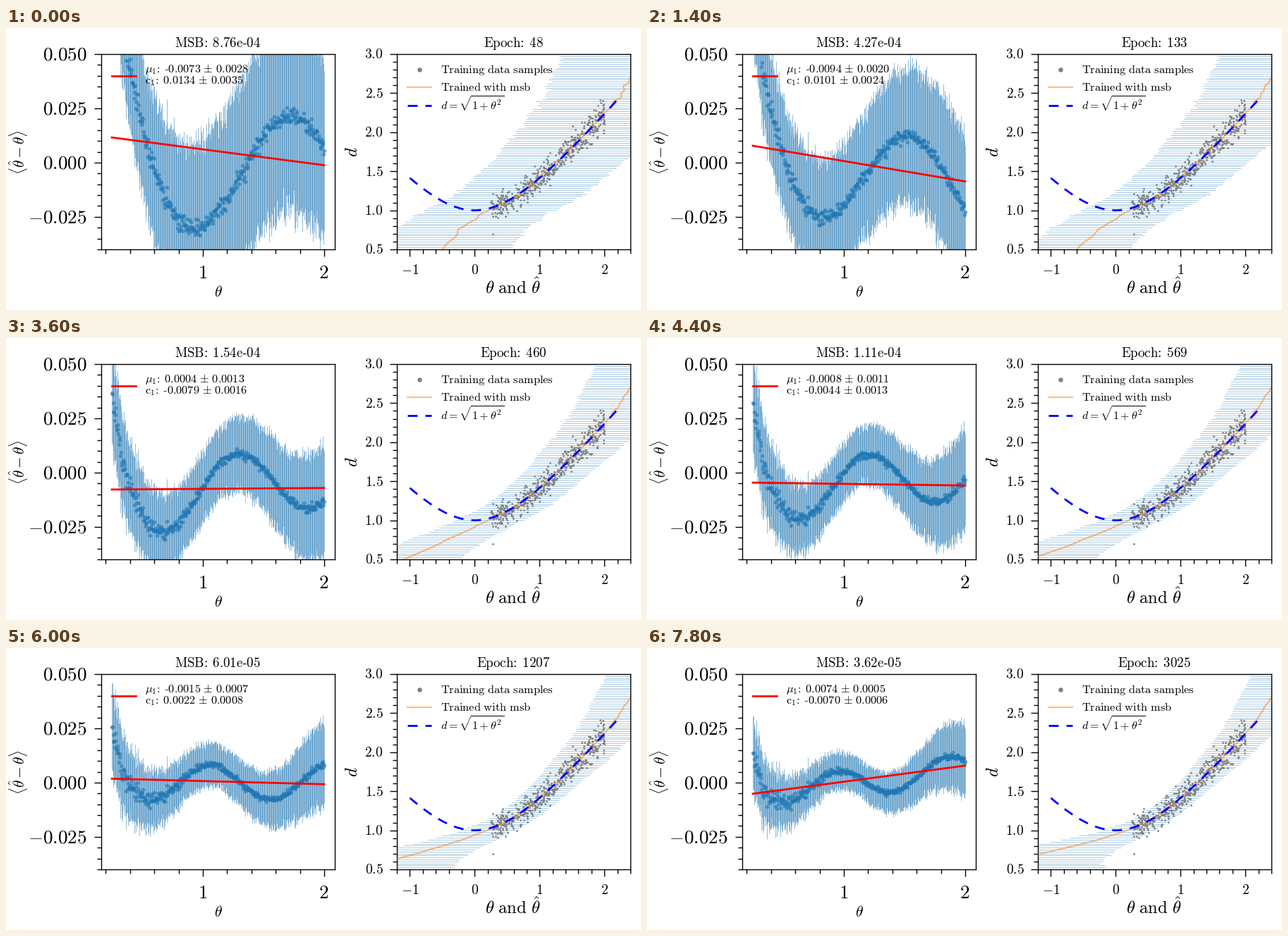
A matplotlib script for the animation above (8 s loop, 900 by 400 pixels).

```python
import numpy as np
import matplotlib.pyplot as plt
from matplotlib.animation import FuncAnimation
from matplotlib.lines import Line2D
from matplotlib.ticker import MultipleLocator

plt.rcParams.update({
    "font.family": "Liberation Serif",
    "mathtext.fontset": "cm",
    "axes.linewidth": 1.0,
})

W, H = 900, 400
FRAMES, INTERVAL = 40, 200
BLUE, ORANGE, GRAY = "tab:blue", "tab:orange", "gray"

# Training milestones: frame, epoch, MSB, then slope, slope error, offset (1e-4)
MILESTONES = np.array([
    [0, 48, 8.76e-4, -73, 28, 134],
    [7, 133, 4.27e-4, -94, 19.6, 101],
    [13, 320, 2.36e-4, -22, 17, 21],
    [18, 460, 1.54e-4, 4, 13, -79],
    [26, 705, 8.01e-5, -19, 8, -10],
    [34, 2066, 4.51e-5, -10, 5, 53],
    [39, 3025, 3.62e-5, 74, 5, -70],
])
STEP, EPOCH, MSB, SLOPE, ERROR, OFFSET = MILESTONES.T

rng = np.random.default_rng(7)
theta = np.linspace(.25, 2, 400)
point_noise = rng.normal(size=theta.size)
bar_noise = 1 + .08 * rng.normal(size=theta.size)
rows = np.linspace(.5, 3, 100)
row_noise = np.convolve(rng.normal(size=rows.size), [.35, .6, .35], "same")
row_noise *= .25 + .75 * np.clip(np.abs(rows - 1.6) - .5, 0, .5) / .5
width_noise = 1 + .025 * rng.normal(size=rows.size)
sample_x = rng.uniform(.25, 2, 500)
sample_d = np.sqrt(1 + sample_x ** 2) + rng.normal(0, .09, 500)
sample_x[0], sample_d[0] = .277, .7


def at(values, i):
    return np.interp(i, STEP, values)


def at_log(values, i):
    return np.exp(at(np.log(values), i))


def ripple(s):
    """Unit-variance bias wave without linear trend; tightens as s grows."""
    dip = .89 - .15 * s + .007 * s * s
    wave = -np.cos(np.pi * (theta - dip) / (.95 * dip))
    wave += 3 * np.exp(-(theta - .25) / (.2 * dip))
    wave -= np.polyval(np.polyfit(theta, wave, 1), theta)
    return wave / wave.std()


def bias_spread(s):
    rising = 1.13 * (1 - np.exp(-theta / .4))
    bowl = .62 + .85 * (theta - 1.1) ** 2
    mix = min(s / 2.4, 1)
    return .039 * np.exp(-s / 3) * ((1 - mix) * rising + mix * bowl)


def estimate(s):
    """Learned inverse of d(theta), bending away outside the training range."""
    below = np.maximum(1.1 - rows, 0)
    above = np.maximum(rows - 2.25, 0)
    inner = np.sqrt(np.clip(rows, 1.1, 2.25) ** 2 - 1)
    bend = .54 * s * s - 1.3
    return (inner - 2.4 * below - bend * below ** 2 + .85 * above
            + .06 / (1 + s) * row_noise)


def estimate_spread(s):
    low = np.maximum(1.5 - rows, 0)
    high = np.maximum(rows - 1.5, 0)
    width = np.exp(-.4 * s) + .18 * high + .06 * s ** 3 * low ** 4
    return width * width_noise


def rm(s):
    """Roman math text with true hyphens."""
    parts = []
    for chunk in s.split("-"):
        words = [rf"\text{{{w}}}" if w else "" for w in chunk.split(" ")]
        parts.append("$" + "~".join(words) + "$" if chunk else "")
    return "-".join(parts).replace(":}~", r":}\hspace{0.44}")


def measure(name, value, error):
    return f"${name}$" + rm(f": {value:.4f} ") + r"$\pm$" + rm(f" {error:.4f}")


def put(x, y, s, size, ha="center", **kw):
    return fig.text(x / W, 1 - y / H, s, size=size, ha=ha, va="baseline", **kw)


def upright(x, y, s, size):
    put(x, y, s, size, rotation=90, rotation_mode="anchor")


def stroke(x0, x1, y, **kw):
    fig.add_artist(Line2D([x0 / W, x1 / W], [1 - y / H] * 2,
                          transform=fig.transFigure, **kw))


def panel(x0, xlim, ylim, xstep, ystep):
    ax = fig.add_axes([x0 / W, 86 / H, 331 / W, 277 / H])
    ax.set(xlim=xlim, ylim=ylim)
    for axis, (major, minor) in ((ax.xaxis, xstep), (ax.yaxis, ystep)):
        axis.set_major_locator(MultipleLocator(major))
        axis.set_minor_locator(MultipleLocator(minor))
    ax.tick_params(which="both", labelleft=False, labelbottom=False, width=1)
    ax.tick_params(which="major", length=7)
    ax.tick_params(which="minor", length=4)
    return ax


fig = plt.figure(figsize=(W / 100, H / 100), dpi=100, facecolor="white")

# Left panel
left = panel(135, (.1625, 2.0875), (-.04, .05), (1, .2), (.025, .005))
bars = left.vlines(theta, 0 * theta, 0 * theta, color=BLUE, lw=.58, alpha=.6, zorder=1)
dots, = left.plot([], [], "o", color=BLUE, ms=3, alpha=.5, zorder=2)
fit, = left.plot([], [], color="red", lw=2, zorder=3)
for v in (.05, .025, 0, -.025):
    put(114.5, 190.9 - v * 3077.8 + 8.8, f"${v:.3f}$", 19.6, ha="right")
for v in (1, 2):
    put(278.5 + 172 * (v - 1), 355, f"${v}$", 19.6)
put(300.5, 381, r"$\theta$", 15.4)
upright(27, 176, r"$\langle\hat{\theta} - \theta\rangle$", 15.3)
stroke(150, 184, 68, color="red", lw=2)
slope_text = put(197, 63, "", 11.75, ha="left")
offset_text = put(197, 79, "", 11.75, ha="left")
msb_text = put(299.7, 27, "", 13.6)

# Right panel
right = panel(554, (-1.2, 2.4), (.5, 3), (1, .2), (.5, .1))
spans = right.hlines(rows, 0 * rows, 0 * rows, color=BLUE, lw=.5, alpha=.55, zorder=1)
right.plot(sample_x, sample_d, "o", color=GRAY, ms=2, mew=0, zorder=2)
curve, = right.plot([], [], color=ORANGE, lw=1.5, alpha=.5, zorder=3)
ideal = np.linspace(-1, 2.2, 200)
dash = dict(color="blue", lw=2, dashes=(5, 4), dash_capstyle="butt")
right.plot(ideal, np.sqrt(1 + ideal ** 2), zorder=4, **dash)
for v in np.arange(.5, 3.1, .5):
    put(534.5, 314 - (v - .5) * 110.8 + 6.4, f"${v:.1f}$", 14, ha="right")
for v in (-1, 0, 1, 2):
    put(664.3 + 91.94 * v, 348.7, f"${v}$", 14)
put(718.5, 377, r"$\theta~\text{and}~\hat{\theta}$", 17.7)
upright(498, 176, "$d$", 17.6)
fig.add_artist(Line2D([586.3 / W], [1 - 59 / H], marker="o", ms=4.7, mew=0,
                      color=GRAY, ls="none", transform=fig.transFigure))
stroke(569, 602.5, 84, color=ORANGE, lw=1.5, alpha=.5)
stroke(569, 602.5, 110, **dash)
put(615.5, 64, rm("Training data samples"), 11.75, ha="left")
put(615.5, 89, rm("Trained with msb"), 11.75, ha="left")
put(615.5, 116, r"$d = \sqrt{1 + \theta^2}$", 11.5, ha="left")
epoch_text = put(719, 27, "", 13.7)


def segments(x0, y0, x1, y1):
    return np.stack([np.c_[x0, y0], np.c_[x1, y1]], axis=1)


def draw(i):
    msb = at_log(MSB, i)
    s = np.log(MSB[0] / msb)
    slope, error, offset = (at(v, i) * 1e-4 for v in (SLOPE, ERROR, OFFSET))
    line = offset + slope * theta

    # The slope error of a straight fit gives the size of the residual.
    residual = error * np.sqrt(theta.size) * theta.std()
    spread = bias_spread(s)
    noise = .045 * spread + .003 * np.exp(-(theta - .25) / .42)
    bias = line + residual * ripple(s) + noise * point_noise
    spread = spread * bar_noise
    dots.set_data(theta, bias)
    bars.set_segments(segments(theta, bias - spread, theta, bias + spread))
    fit.set_data(theta, line)

    guess, width = estimate(s), estimate_spread(s)
    curve.set_data(guess, rows)
    spans.set_segments(segments(guess - width, rows, guess + width, rows))

    offset_error = error * np.sqrt(np.mean(theta ** 2))
    slope_text.set_text(measure(r"\mu_1", slope, error))
    offset_text.set_text(measure(r"\mathrm{c}_1", offset, offset_error))
    msb_text.set_text(rm(f"MSB: {msb:.2e}"))
    epoch_text.set_text(rm(f"Epoch: {at_log(EPOCH, i):.0f}"))
    return dots, bars, fit, curve, spans


anim = FuncAnimation(fig, draw, frames=FRAMES, interval=INTERVAL,
                     repeat=True, repeat_delay=0, blit=False)
plt.show()
```
